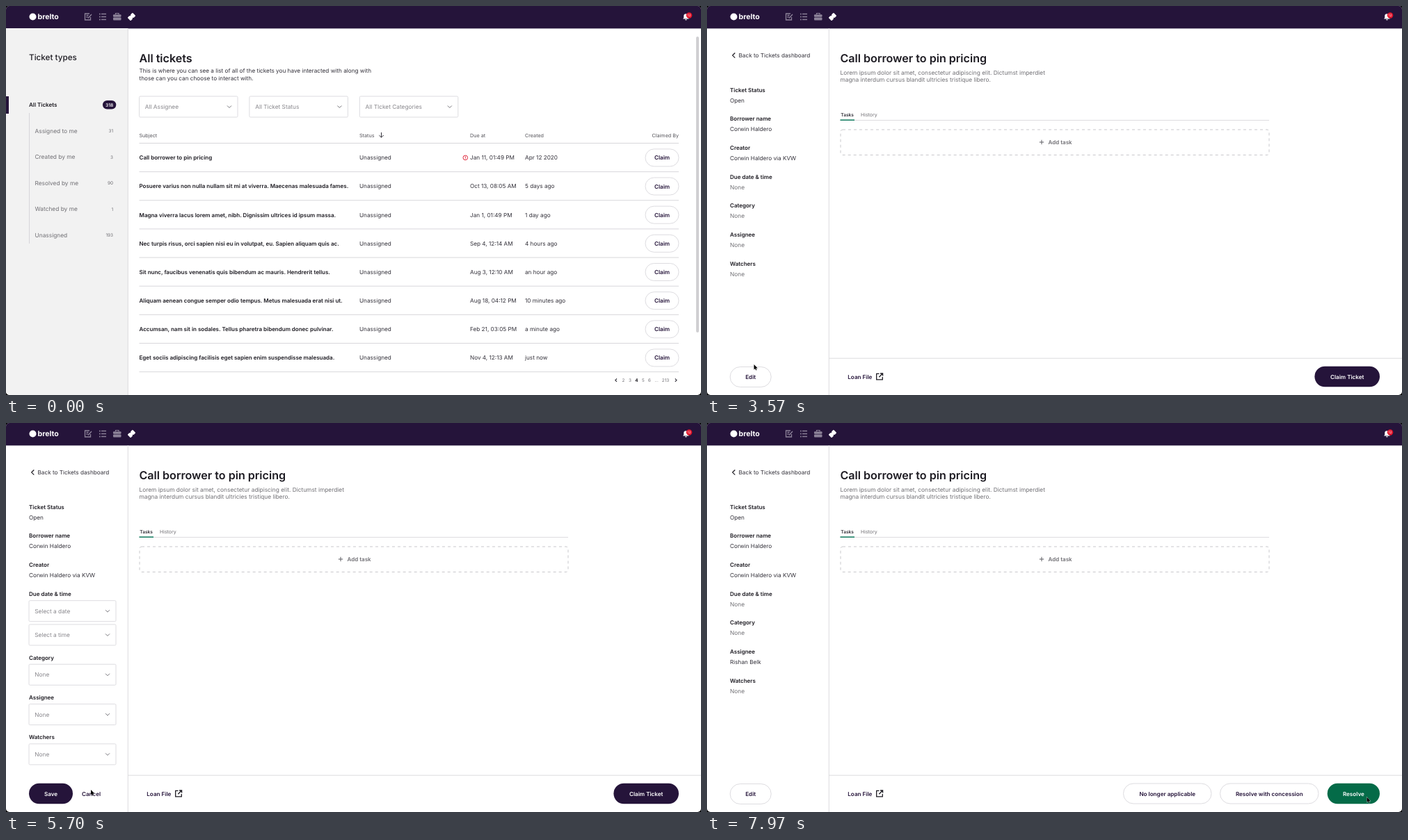
Animation, 999 px wide and 560 px high, one loop 8 s. Source, as an HTML page:

```html
<!DOCTYPE html>
<html lang="en">
<head>
<meta charset="utf-8">
<title>Ticket dashboard</title>
<style>
  html, body { margin: 0; width: 100%; height: 100%; overflow: hidden; background: #000; }
  svg { display: block; width: 999px; height: 560px; font-family: Inter, Roboto, sans-serif; text-rendering: geometricPrecision; }
  text { font-size: 8.2px; fill: #33313a; white-space: pre; }
  .b { font-size: 8px; font-weight: 600; fill: #1d1b22; }
  .btn { font-size: 8.1px; font-weight: 600; fill: #25143a; }
  .inv { fill: #fff; }
  .h1 { font-size: 16.1px; font-weight: 600; fill: #1d1b22; }
  .h2 { font-size: 11.7px; font-weight: 500; fill: #1d1b22; }
  .dim { font-size: 8.35px; fill: #717075; }
  .hint { font-size: 8.3px; fill: #88878c; }
  .col { font-size: 7.2px; fill: #55545a; }
  .num { font-size: 6.4px; fill: #717075; }
  .tab { font-size: 7px; fill: #717075; }
</style>
</head>
<body>
<svg id="stage" viewBox="0 0 999 560" xmlns="http://www.w3.org/2000/svg"></svg>
<script>
const LOOP = 8000, W = 999;
const DARK = '#25143a', GREEN = '#046b48', LINE = '#dddce0';

// Drawing helpers; text is placed by its vertical centre.
const text = (x, y, str, cls = '', anchor = 'start') =>
  `<text x="${x}" y="${y + 3}" class="${cls}" text-anchor="${anchor}">${str}</text>`;
const rect = (x, y, w, h, fill, r = 0, extra = '') =>
  `<rect x="${x}" y="${y}" width="${w}" height="${h}" rx="${r}" fill="${fill}" ${extra}/>`;
const path = (d, color, width = 1, extra = '') =>
  `<path d="${d}" fill="none" stroke="${color}" stroke-width="${width}" ${extra}/>`;
const outline = (x, y, w, h, r) => rect(x, y, w, h, '#fff', r, `stroke="${LINE}"`);
const chevron = (x, y) => path(`M${x - 3} ${y - 1.5}l3 3l3-3`, '#77767c', 1);

function pill(x, y, w, h, label, fill) {
  const box = fill ? rect(x, y, w, h, fill, h / 2)
    : rect(x, y, w, h, 'none', h / 2, `stroke="${LINE}"`);
  return box + text(x + w / 2, y + h / 2, label, fill ? 'btn inv' : 'btn', 'middle');
}

function select(x, y, w, label) {
  return outline(x, y, w, 30, 1.5) + text(x + 8.3, y + 15, label, 'hint') + chevron(x + w - 12, y + 15);
}

function header() {
  const c = '#8d8399';
  const list = [11.5, 15.5, 19.5].map(y =>
    rect(134, y - .8, 1.7, 1.7, c) + rect(137, y - .7, 7, 1.4, c)).join('');
  return rect(0, 0, W, 32.4, DARK)
    + '<circle cx="38.5" cy="15.5" r="5" fill="#fff"/>'
    + '<text x="45.5" y="19" style="font-size:10.6px;font-weight:700;fill:#fff">brelto</text>'
    + path('M120 11h-6.5v9h8v-4', c, 1.3) + path('M115.5 13.5h3M115.5 16h2M118 17.5l5-5.5', c, 1.3)
    + list
    + rect(154, 12.3, 11.5, 3.5, c, 1) + rect(154, 16.5, 11.5, 4, c, 1) + path('M157.5 12v-1.5h4.5v1.5', c, 1.2)
    + '<g transform="rotate(-45 180.5 15.5)">' + rect(175.3, 12.3, 10.4, 6.4, '#fff', 1)
    + `<circle cx="180.5" cy="12.1" r="1.2" fill="${DARK}"/><circle cx="180.5" cy="18.9" r="1.2" fill="${DARK}"/></g>`
    + '<path d="M973 18.5l1.2-1.5v-2.5a3.2 3.2 0 0 1 6.4 0v2.5l1.2 1.5zM976 19.2h2.8a1.4 1.4 0 0 1-2.8 0z" fill="#fff"/>'
    + '<circle cx="982" cy="13.5" r="4.2" fill="#e3172d"/>'
    + '<text x="982" y="15.3" text-anchor="middle" style="font-size:4.8px;fill:#fff">12</text>';
}

const types = [['Assigned to me', 31], ['Created by me', 3], ['Resolved by me', 90],
  ['Watched by me', 1], ['Unassigned', 193]];

const tickets = [
  ['Call borrower to pin pricing', 'Jan 11, 01:49 PM', 'Apr 12 2020'],
  ['Posuere varius non nulla nullam sit mi at viverra. Maecenas malesuada fames.', 'Oct 13, 08:05 AM', '5 days ago'],
  ['Magna viverra lacus lorem amet, nibh. Dignissim ultrices id ipsum massa.', 'Jan 1, 01:49 PM', '1 day ago'],
  ['Nec turpis risus, orci sapien nisi eu in volutpat, eu. Sapien aliquam quis ac.', 'Sep 4, 12:14 AM', '4 hours ago'],
  ['Sit nunc, faucibus venenatis quis bibendum ac mauris. Hendrerit tellus.', 'Aug 3, 12:10 AM', 'an hour ago'],
  ['Aliquam aenean congue semper odio tempus. Metus malesuada erat nisi ut.', 'Aug 18, 04:12 PM', '10 minutes ago'],
  ['Accumsan, nam sit in sodales. Tellus pharetra bibendum donec pulvinar.', 'Feb 21, 03:05 PM', 'a minute ago'],
  ['Eget sociis adipiscing facilisis eget sapien enim suspendisse malesuada.', 'Nov 4, 12:13 AM', 'just now'],
];

function listPage() {
  let s = rect(0, 32, 175, 528, '#f2f2f2') + path('M175.3 32V560', '#dcdbde')
    + text(33, 74.6, 'Ticket types', 'h2')
    + rect(0, 130, 4, 25, DARK) + text(33, 142.2, 'All Tickets', 'b')
    + rect(139, 136, 19.3, 12.5, DARK, 6.2)
    + '<text x="148.6" y="144.7" text-anchor="middle" style="font-size:6.6px;font-weight:600;fill:#fff">318</text>'
    + path('M33.5 154V342', '#d6d5d9');
  types.forEach(([name, n], i) => {
    const y = 179.8 + 37.5 * i;
    s += text(41.5, y, name, 'dim') + text(154, y - .5, n, 'num', 'end');
  });

  s += text(191.5, 77.9, 'All tickets', 'h1')
    + text(191.5, 93.2, 'This is where you can see a list of all of the tickets you have interacted with along with')
    + text(191.5, 103.6, 'those can you can choose to interact with.');
  ['All Assignee', 'All Ticket Status', 'All TIcket Categories'].forEach((name, i) => {
    s += select(191.5 + 158.4 * i, 130, 141.5, name);
  });

  [[191.5, 'Subject'], [508, 'Status'], [667, 'Due at'], [746, 'Created']].forEach(([x, name]) => {
    s += text(x, 185.7, name, 'col');
  });
  s += text(967, 185.7, 'Claimed By', 'col', 'end')
    + path('M539.5 182v7M536.3 186l3.2 3.2l3.2-3.2', '#33313a');
  for (let i = 0; i <= tickets.length; i++) s += path(`M191.5 ${197.5 + 41.15 * i}H967`, '#d8d7db');

  // The highlight hides the rules around its row.
  s += '<g id="hover">' + rect(187, 197, 784, 42.2, '#f1f1f1', 4) + '</g>';
  tickets.forEach(([subject, due, created], i) => {
    const y = 218.2 + 41.15 * i;
    s += text(191.5, y, subject, 'b') + text(508, y, 'Unassigned')
      + text(667, y, due) + text(746, y, created)
      + pill(919, y - 12.3, 48, 25, 'Claim');
  });
  s += '<circle cx="660.3" cy="218.4" r="3.3" fill="none" stroke="#e0283c"/>'
    + path('M660.3 216.4v2.4M660.3 219.4v1', '#e0283c');

  [[887.5, 2], [897, 3], [906.5, 4], [916, 5], [925, 6], [935, '...'], [948, 213]].forEach(([x, n]) => {
    s += `<text x="${x}" y="541.3" text-anchor="middle" class="num"${n === 4 ? ' style="font-weight:700;fill:#1d1b22"' : ''}>${n}</text>`;
  });
  return s + path('M878 536.5l-2.2 2.2l2.2 2.2M961.8 536.5l2.2 2.2l-2.2 2.2', '#33313a', 1.1)
    + rect(992, 44, 4, 426, '#d0cfd2', 2);
}

function detailPage({ editing = false, claimed = false }) {
  let s = path('M175.3 32V560M175 507.2H999', '#dcdbde')
    + path('M40.3 67.5l-3.6 3.6l3.6 3.6', '#1d1b22', 1.2)
    + text(45.5, 71, 'Back to Tickets dashboard');
  const fields = [['Ticket Status', 'Open'], ['Borrower name', 'Corwin Haldero'],
    ['Creator', 'Corwin Haldero via KVW'], ['Due date &amp; time', 'None'], ['Category', 'None'],
    ['Assignee', claimed ? 'Rishan Belk' : 'None'], ['Watchers', 'None']];
  fields.forEach(([label, value], i) => {
    const y = 120.8 + 41.67 * i;
    if (!editing || i < 3) {
      s += text(33, y, label, 'b') + text(33, y + 14.7, value, value === 'None' ? 'dim' : '');
    } else if (i === 3) {
      s += text(33, y, label, 'b') + select(33, 255.7, 125, 'Select a date') + select(33, 290, 125, 'Select a time');
    } else {
      const top = 337.6 + 57.3 * (i - 4);
      s += text(33, top, label, 'b') + select(33, top + 9.7, 125, value);
    }
  });
  s += editing
    ? pill(33, 518.8, 63, 29.4, 'Save', DARK) + text(109, 533.5, 'Cancel', 'btn')
    : pill(33.2, 519.5, 59, 29, 'Edit');

  s += text(191.5, 77.9, 'Call borrower to pin pricing', 'h1')
    + text(191.5, 95.7, 'Lorem ipsum dolor sit amet, consectetur adipiscing elit. Dictumst imperdiet', 'dim')
    + text(191.5, 105.9, 'magna interdum cursus blandit ultricies tristique libero.', 'dim')
    + '<text x="192.3" y="159" style="font-size:6.6px;font-weight:600">Tasks</text>'
    + text(221, 156.2, 'History', 'tab')
    + path('M191.5 164.5H808', LINE) + rect(191.5, 163.4, 20.5, 1.6, '#1b8065')
    + rect(192, 178, 616, 36.5, 'none', 3, 'stroke="#c9c8cc" stroke-dasharray="4 4"')
    + path('M477.8 196h6.4M481 192.8v6.4', '#5f5e64')
    + '<text x="490.5" y="199" class="b" style="fill:#717075">Add task</text>'
    + text(202.3, 533.5, 'Loan File', 'btn')
    + path('M247.5 529.3h-3.8v8.6h8.6v-3.8M249 529h3.6v3.6M252.3 529.3l-5 5', '#1d1b22', 1.3);
  return s + (claimed
    ? pill(598.5, 519, 126.5, 29, 'No longer applicable') + pill(737.5, 519, 141.5, 29, 'Resolve with concession')
      + pill(891.7, 518.8, 75.3, 29.4, 'Resolve', GREEN)
    : pill(873.4, 518.8, 93.6, 29.4, 'Claim Ticket', DARK));
}

const bodies = [listPage(), detailPage({}), detailPage({ editing: true }), detailPage({}), detailPage({ claimed: true })];
const stage = document.getElementById('stage');
stage.innerHTML = '<clipPath id="frame"><rect width="999" height="560" rx="5"/></clipPath>'
  + bodies.map(body => `<g class="page"><g clip-path="url(#frame)">${rect(0, 0, W, 560, '#fff')}${header()}${body}</g></g>`).join('')
  + '<g id="cursor"><path transform="scale(.46)" d="M0 0V16.5L3.8 12.8L6.2 18.6L8.6 17.6L6.2 12H11.5Z" fill="#000" stroke="#fff" stroke-width="1.4" paint-order="stroke"/></g>';

const pages = [...stage.querySelectorAll('.page')];
const cursor = document.getElementById('cursor');
const hover = document.getElementById('hover');

// Start of each push to the next page, and how far it still has to go (ms, px).
const pushes = [2070, 3870, 5970, 7700];
const pushSteps = [[0, W], [30, 200], [60, 3.4], [100, 0]];

// Pointer stops: time, x, y.
const stops = [
  [1070, 1002, 240], [1500, 898, 210], [3130, 898, 210], [3570, 67.5, 516], [3730, 65, 533],
  [4200, 65, 533], [4700, 67, 523], [4930, 111, 516.5], [5530, 118, 525], [5600, 118, 525],
  [5700, 122, 528], [6000, 122, 528], [6330, 162, 514.5], [6830, 162, 514.5],
  [7400, 934, 545], [7470, 948.5, 538.5], [LOOP, 948.5, 538.5],
];
const ease = p => p < .5 ? 2 * p * p : 1 - 2 * (1 - p) ** 2;

function pointer(t) {
  const i = stops.findIndex(s => t < s[0]);
  if (i < 1) return null;
  const [t0, x0, y0] = stops[i - 1], [t1, x1, y1] = stops[i];
  const p = ease((t - t0) / (t1 - t0));
  return [x0 + (x1 - x0) * p, y0 + (y1 - y0) * p];
}

function draw(t) {
  const current = pushes.filter(start => t >= start).length;
  let left = 0;
  if (current) {
    const age = t - pushes[current - 1];
    left = pushSteps.filter(([at]) => age >= at).pop()[1];
  }
  pages.forEach((page, i) => {
    const x = left + (i - current) * W;
    page.style.display = Math.abs(x) < W ? '' : 'none';
    page.setAttribute('transform', `translate(${x} 0)`);
  });

  const at = pointer(t);
  cursor.style.display = at ? '' : 'none';
  if (at) cursor.setAttribute('transform', `translate(${at})`);
  const over = at && at[0] > 187 && at[0] < 971 && at[1] > 198 && at[1] < 238.5;
  hover.style.display = over ? '' : 'none';
}

const begin = performance.now();
function tick() {
  draw((performance.now() - begin) % LOOP);
  requestAnimationFrame(tick);
}
tick();
</script>
</body>
</html>
```
